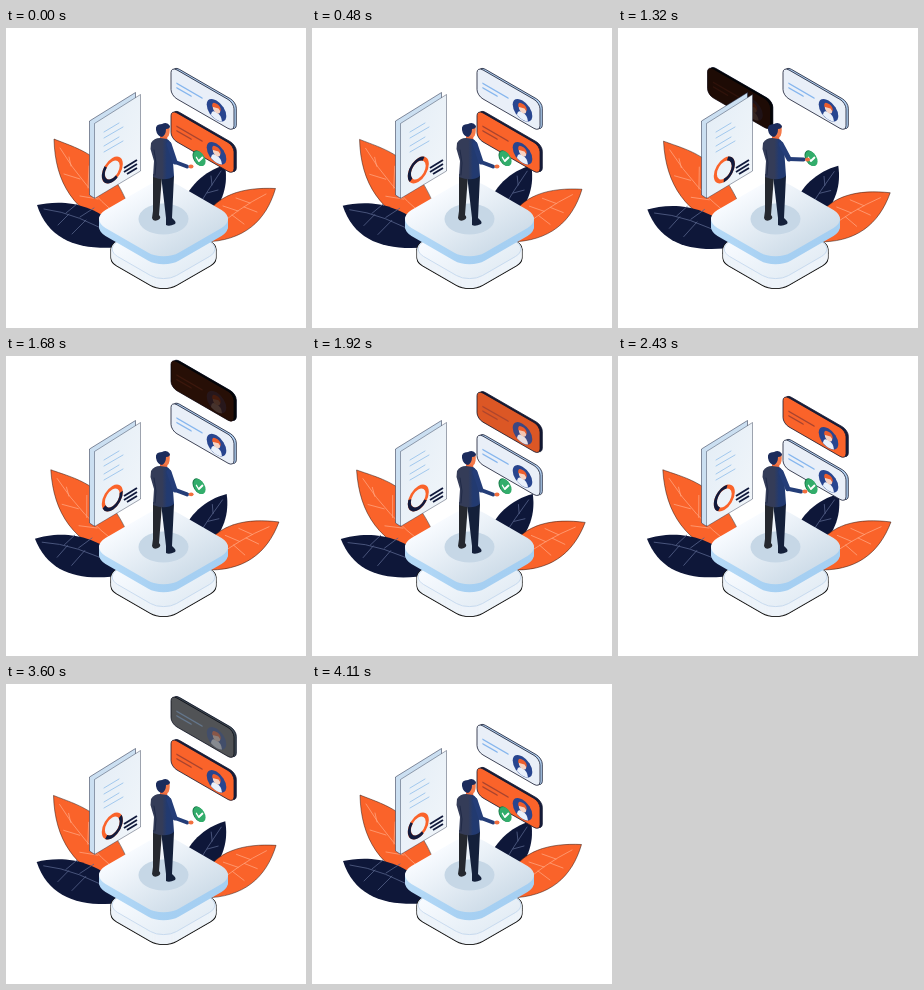
Animation of 300x300 px, one loop 4.53 s. Source, as an HTML page:

```html
<!DOCTYPE html>
<html lang="en">
<head>
<meta charset="utf-8">
<title>Choosing profile cards</title>
<style>
  html, body { margin: 0; width: 100%; height: 100%; overflow: hidden; background: #fff; }
  svg { display: block; width: 100vw; height: 100vh; }
  .line { fill: none; stroke-linecap: round; stroke-linejoin: round; }
</style>
</head>
<body>
<svg viewBox="0 0 300 300">
  <defs>
    <linearGradient id="plate"><stop offset="0" stop-color="#f8fbff"/><stop offset="1" stop-color="#cfdde9"/></linearGradient>
    <linearGradient id="foot"><stop offset="0" stop-color="#f8fbff"/><stop offset="1" stop-color="#e4edf5"/></linearGradient>
    <linearGradient id="paper" x2="1" y2="1"><stop offset="0" stop-color="#e3edf6"/><stop offset="1" stop-color="#f2f6fa"/></linearGradient>
    <linearGradient id="side"><stop offset="0" stop-color="#b9dcf8"/><stop offset="1" stop-color="#a5cff2"/></linearGradient>
    <linearGradient id="suit"><stop offset=".5" stop-color="#343c58"/><stop offset=".7" stop-color="#223a70"/></linearGradient>
  </defs>

  <g id="leafA">
    <path fill="#fa632a" stroke="#2a1510" stroke-width=".5" d="M48 111C75 122 105 128 125 185L112 202C68 185 49 155 48 111Z"/>
    <path class="line" stroke="#ffa27c" stroke-width=".8" d="M54 120Q78 160 112 188M65 138L63 129M74 151L58 146M82 160L83 138M92 171L74 168"/>
  </g>
  <g id="leafB">
    <path fill="#0e1739" d="M31 177C50 173 85 170 118 205L118 219C75 223 43 214 31 177Z"/>
    <path class="line" stroke="#56628a" stroke-width=".8" d="M38 181Q72 185 112 210M60 185L71 176M74 189L88 180M63 186L52 197M80 192L66 206"/>
  </g>
  <g id="leafC">
    <path fill="#0e1739" d="M219 137C222 155 219 175 198 195L176 180C180 160 198 143 219 137Z"/>
    <path class="line" stroke="#56628a" stroke-width=".8" d="M215 143Q202 162 190 182M206 157L205 148M201 165L212 162"/>
  </g>
  <g id="leafD">
    <path fill="#fa632a" stroke="#2a1510" stroke-width=".5" d="M269.500 160.500C260 193 238 213 198 214L196 195C208 166 238 159 269.500 160.500Z"/>
    <path class="line" stroke="#ffa27c" stroke-width=".8" d="M260 166Q232 180 204 205M244 175L230 170M232 183L217 178M238 179L251 184M226 187L238 196"/>
  </g>

  <g id="cards"></g>
  <g id="base"></g>

  <g id="sheet">
    <path fill="#cbdff1" stroke="#18213c" stroke-width=".5" d="M83.500 93L129.500 64.500V138L88 170L83.500 167Z"/>
    <path fill="url(#paper)" stroke="#18213c" stroke-width=".4" d="M88.500 95.500L134.500 66.500V143L88.500 170.500Z"/>
    <path class="line" stroke="#a3c9ee" stroke-width="1" d="M98 104L113 95M98 110L117 99M98 118L113 109M98 124L117 113"/>
    <path stroke="#111a3c" stroke-width="1.9" d="M118 140L131 132M118 144L131 136M121 146L131 140"/>
    <g transform="matrix(.87 -.5 0 1 106.300 142)" fill="none" stroke-width="3.600">
      <circle r="10.300" stroke="#fa632a"/>
      <circle id="share" r="10.300" stroke="#111a3c" pathLength="100" stroke-dasharray="45 55"/>
    </g>
  </g>

  <ellipse cx="157.5" cy="191" rx="25" ry="15.5" fill="#c6d7e6"/>
  <g transform="matrix(.87 .42 0 1 193.500 130.500)">
    <circle cx="-1" r="7.1" fill="#187a49"/>
    <circle r="7" fill="#32ad6b"/>
    <path class="line" stroke="#fff" stroke-width="1.7" d="M-3.4 .5L-.9 3L3.6 -2.6"/>
  </g>

  <g id="man">
    <path fill="#25282f" d="M147 146L156 148L153 187Q156 190 152 192Q147 194 146 190L147 183Z"/>
    <path fill="#14203a" d="M155 147L168 148L166 190Q171 194 169 196Q163 199 160 197L160 190Z"/>
    <path fill="#ee6b3e" d="M154 104L162 103L161 113L154 113Z"/>
    <path fill="#f47a4a" d="M158 98H163.500Q164.500 107 161.500 109L157 108Z"/>
    <path fill="#1c2c5c" d="M150 102Q149 96 156 96Q161 93 164 98Q164 101 160 101Q160 107 156 109Q151 108 150 102Z"/>
    <path fill="url(#suit)" d="M145 115Q148 110 154 110L161 111Q165 113 166 120L168 148Q160 154 147 149L148 133L144.500 121Z"/>
    <path class="line" stroke="#1d2744" stroke-width=".9" d="M148 122L150 135L149 147"/>
    <path id="sleeve" class="line" stroke="#243d78" stroke-width="5"/>
    <path id="cuff" class="line" stroke="#243d78" stroke-width="4"/>
    <ellipse id="hand" rx="2.500" ry="1.900" fill="#f2703f"/>
  </g>
</svg>

<script>
const $ = id => document.getElementById(id);
const LOOP = 4530, END = 4110, STEP = 30;

// Rounded square lying flat, seen isometrically
const tile = (cy, half, r, fill, extra = '') =>
  `<rect x="${-half}" y="${-half}" width="${2 * half}" height="${2 * half}" rx="${r}" fill="${fill}" ${extra}
    transform="matrix(.866 .5 -.866 .5 157.5 ${cy})"/>`;

function slab(cy, half, r, depth, top, side, extra = '') {
  let out = '';
  for (let d = depth; d > 0; d--) out += tile(cy + d, half, r, side, extra);
  return out + tile(cy, half, r, top, extra);
}

const outline = 'stroke="#111" stroke-width="1.2"';
$('base').innerHTML =
  slab(221, 34.5, 15, 9.5, '#111', '#111', outline) +
  slab(221, 34.5, 15, 9, 'url(#foot)', '#edf3f9') +
  tile(221, 34, 15, 'none', 'stroke="#c5d8ee" stroke-width=".8"') +
  slab(191, 42.5, 18, 8, 'url(#plate)', 'url(#side)');

function card(id, face, back, lines) {
  const box = (x, y, fill, extra = '') =>
    `<rect x="${x}" y="${y}" width="63" height="29" rx="6" fill="${fill}" ${extra}/>`;
  const edge = 'stroke="#141a30" stroke-width=".7"';
  return `<g id="${id}"><g transform="matrix(1 .577 0 1 165 0)">
    ${box(2.3, -2, back, edge)}${box(0, 0, face, edge)}
    <g class="shade">${box(2.3, -2, '#000')}${box(0, 0, '#000')}</g>
    <g class="info">
      <path class="line" stroke="${lines}" stroke-width="1.5" d="M6 13.500H31M6 18H20"/>
      <g transform="translate(45.500 17.500)">
        <circle r="9.800" fill="#28458f"/>
        <path fill="#e9f0fb" d="M-5.500 8Q-5 2 0 2Q5 2 5.500 8Q0 11 -5.500 8Z"/>
        <circle cy="-1" r="3.700" fill="#f6d3c4"/>
        <path fill="#ee5d2c" d="M-4.200 -1Q-5 -7 1 -6.500Q5 -6 4 -1L2 -3Z"/>
      </g>
    </g>
  </g></g>`;
}
$('cards').innerHTML =
  card('white', '#e9eff8', '#b3d2f3', '#86b6ee') +
  card('orange', '#fa632a', '#151c3c', '#a8442f');

const clamp = u => Math.min(1, Math.max(0, u));
// Ease in and out; the curve f covers the first half
const ease = f => (t, start, span) => {
  const u = clamp((t - start) / span);
  return u < .5 ? f(2 * u) / 2 : 1 - f(2 - 2 * u) / 2;
};
const ramp = ease(v => v ** 3);
const swipe = ease(v => v * v * (2 * v - 1)); // with a slight wind-up

// Fading cards darken, then vanish
function place(id, x, y, fade) {
  const el = $(id), alpha = clamp(fade);
  el.setAttribute('transform', `translate(${x} ${y})`);
  el.setAttribute('visibility', alpha < .04 ? 'hidden' : 'visible');
  el.querySelector('.shade').setAttribute('opacity', 1 - alpha);
  el.querySelector('.info').setAttribute('opacity', alpha);
}

const sway = (id, angle, x, y) => $(id).setAttribute('transform', `rotate(${angle} ${x} ${y})`);

function draw(t) {
  const left = swipe(t, 791, 833), right = swipe(t, 2515, 833);
  const drop1 = ramp(t, 1450, 675), drop2 = ramp(t, 3298, 680);
  const TOP = 38.5, GAP = 43;

  if (t < 1450) place('orange', -86 * left, TOP + GAP - 50 * left, 1 - left);
  else place('orange', 0, TOP + GAP * (drop1 + drop2 - 1), drop1);

  if (t < 3298) place('white', 69 * right, TOP + GAP * drop1 + 40 * right, 1 - right);
  else place('white', 0, TOP + GAP * (drop2 - 1), drop2);

  const wind = (1 - Math.cos(2 * Math.PI * t / END)) / 2;
  sway('leafA', -2.4 * wind, 118, 195);
  sway('leafB', -4 * wind, 118, 212);
  sway('leafC', 2 * wind, 190, 190);
  sway('leafD', 4.8 * wind, 200, 208);
  $('share').setAttribute('transform', `rotate(${60 + 720 * t / END})`);

  const reach = ramp(t, 500, 400) - ramp(t, 1350, 400) + ramp(t, 2240, 400) - ramp(t, 3090, 400);
  const ex = 169 + 2 * reach, ey = 134 - 3 * reach;
  const hx = 185 + 4.5 * reach, hy = 138.5 - 7 * reach;
  $('sleeve').setAttribute('d', `M163 116L${ex} ${ey}`);
  $('cuff').setAttribute('d', `M${ex} ${ey}L${hx - 4} ${hy}`);
  $('hand').setAttribute('cx', hx);
  $('hand').setAttribute('cy', hy);
}

function frame() {
  const t = performance.now() % LOOP;
  draw(Math.min(END, Math.floor(t / STEP) * STEP));
  requestAnimationFrame(frame);
}
frame();
</script>
</body>
</html>
```
